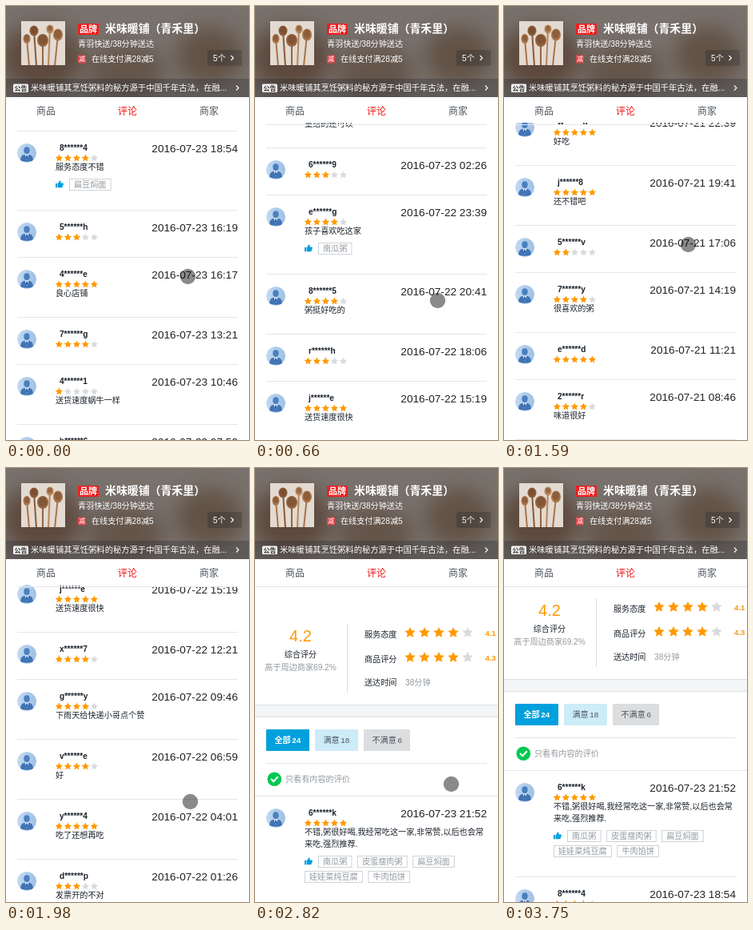
These frames come from a looping animation (304x543 px, 3.85 s). An HTML page:

```html
<!DOCTYPE html>
<html lang="zh-CN">
<head>
<meta charset="utf-8">
<title>商家评论</title>
<style>
html, body { margin: 0; width: 100%; height: 100%; overflow: hidden; background: #fff; }
svg { display: block; width: 100vw; height: 100vh; }
text { font-family: "Liberation Sans", "Noto Sans CJK SC", "Noto Sans CJK", sans-serif; white-space: pre; }
</style>
</head>
<body>
<svg viewBox="0 0 304 543">
  <defs>
    <clipPath id="listClip"><rect y="146" width="304" height="397"/></clipPath>
    <clipPath id="headClip"><rect width="304" height="114"/></clipPath>
    <clipPath id="photoClip"><rect width="55" height="55"/></clipPath>
    <clipPath id="faceClip"><circle r="12"/></clipPath>
    <filter id="blur" x="-30%" y="-30%" width="160%" height="160%"><feGaussianBlur stdDeviation="12"/></filter>
    <linearGradient id="sky" x1="0" x2="1"><stop offset="0" stop-color="#c3daf1"/><stop offset="1" stop-color="#9fc0e4"/></linearGradient>
    <g id="face" clip-path="url(#faceClip)">
      <circle r="12" fill="url(#sky)"/>
      <ellipse cy="-3.4" rx="3.7" ry="4.4" fill="#4a7fc0"/>
      <path d="M-8 9.5Q-8 2.6-2.6 1.8H2.6Q8 2.6 8 9.5Q0 12 -8 9.5Z" fill="#3f74b6"/>
      <path d="M-2.4 1.6L0 8.5L2.4 1.6Z" fill="#fff"/>
      <path d="M-.8 2.4H.8L1 6L0 8.2L-1 6Z" fill="#2c5c9c"/>
    </g>
    <path id="thumb" fill="#00a0dc" d="M-5-1H-2.6V4.2H-5ZM-2-1L.2-4.4Q1.9-4.6 1.5-1.4H4.2Q5.2-1 4.8.2L3.6 3.6Q3.3 4.2 2.6 4.2H-2Z"/>
  </defs>

  <rect width="304" height="543" fill="#fff"/>
  <g clip-path="url(#listClip)"><g id="list"></g></g>
  <rect id="edge" y="148" height="1" fill="#e6e7e9"/>
  <g id="head" clip-path="url(#headClip)">
    <rect width="304" height="114" fill="#78716c"/>
    <g fill="#5d4a3c" filter="url(#blur)">
      <ellipse cx="45" cy="65" rx="50" ry="42"/>
      <ellipse cx="150" cy="82" rx="48" ry="34" opacity=".7"/>
      <ellipse cx="255" cy="62" rx="42" ry="36" opacity=".8"/>
    </g>
    <rect y="91" width="304" height="23" fill="#07111b" opacity=".22"/>
    <g transform="translate(19 19)" clip-path="url(#photoClip)">
      <rect width="55" height="55" fill="#e3dad1"/>
      <g id="spoons"></g>
    </g>
  </g>
  <g id="tabs"></g>
  <circle id="dot" cx=".5" cy=".5" r="9.7" fill="#000" fill-opacity=".46"/>
</svg>
<script>
const $ = id => document.getElementById(id);
const DARK = '#1b232c', GRAY = '#93999f', MID = '#4d555d', GOLD = '#ff9900', LINE = '#e4e6e8';
const SIZE = 10.15;

// Text placed by its vertical middle
function text(s, x, mid, { size = SIZE, fill = DARK, weight = 400, anchor = 'start' } = {}) {
  return `<text x="${x}" y="${mid + size * 0.37}" font-size="${size}" fill="${fill}" ` +
    `text-anchor="${anchor}" font-weight="${weight}">${s}</text>`;
}
const rect = (x, y, w, h, fill, extra = '') =>
  `<rect x="${x}" y="${y}" width="${w}" height="${h}" fill="${fill}" ${extra}/>`;

function star(x, y, r, fill) {
  const pts = Array.from({ length: 10 }, (_, i) => {
    const a = (i / 5 - 0.5) * Math.PI, k = i % 2 ? r * 0.48 : r;
    return (x + k * Math.cos(a)).toFixed(2) + ',' + (y + k * Math.sin(a)).toFixed(2);
  });
  return `<polygon points="${pts.join(' ')}" fill="${fill}"/>`;
}
const stars = (n, x, y, r, gap) =>
  [0, 1, 2, 3, 4].map(i => star(x + i * gap, y, r, i < n ? GOLD : '#d8dade')).join('');

const chevron = (x, y) =>
  `<path d="M${x - 1.5} ${y - 3}l3 3l-3 3" fill="none" stroke="#fff" stroke-width="1.1"/>`;

// Wooden spoons: bowl x, y, radii, handle end x, colour
$('spoons').innerHTML = [
  [7, 22, 4.5, 6, 10, '#a9744a'], [16, 12, 5.5, 6.5, 19, '#8a5a37'], [36, 10, 4.5, 5.5, 34, '#b98659'],
  [27, 24, 7, 8, 27, '#946440'], [46, 17, 6, 7.5, 42, '#a87549']
].map(([x, y, rx, ry, end, c]) =>
  `<path d="M${x} ${y}L${end} 56" stroke="${c}" stroke-width="2"/>` +
  `<ellipse cx="${x}" cy="${y}" rx="${rx}" ry="${ry}" fill="${c}"/>` +
  `<ellipse cx="${x}" cy="${y - 1}" rx="${rx - 1.6}" ry="${ry - 2}" fill="#6b432a" opacity=".45"/>`
).join('');

const white = { fill: '#fff', weight: 500 };
$('head').insertAdjacentHTML('beforeend',
  rect(90, 22, 26, 14, '#f01e1e', 'rx="1"') +
  text('品牌', 103, 28.7, { size: 11, fill: '#fff', weight: 700, anchor: 'middle' }) +
  text('米味暖铺（青禾里）', 124, 28, { size: 13.9, fill: '#fff', weight: 700 }) +
  text('青羽快送/38分钟送达', 90, 47.7, white) +
  rect(90, 61.5, 10, 10, '#e0454a', 'rx="1"') +
  text('减', 95, 66.3, { size: 8, fill: '#fff', anchor: 'middle' }) +
  text('在线支付满28减5', 107, 66.2, white) +
  rect(252, 55, 43, 20, '#07111b', 'rx="2" opacity=".2"') +
  text('5个', 259, 65.2, white) + chevron(283, 65) +
  rect(9, 97.5, 19, 10.5, '#f4f4f4', 'rx="1.5"') +
  text('公告', 18.5, 102.8, { size: 8, fill: '#333', weight: 700, anchor: 'middle' }) +
  text('米味暖铺其烹饪粥料的秘方源于中国千年古法，在融...', 31, 102.5, { ...white, size: 10.3 }) +
  chevron(289.5, 102.5));

$('tabs').innerHTML = [['商品', 50, MID], ['评论', 152, '#f01414'], ['商家', 254, MID]]
  .map(([s, x, fill]) => text(s, x, 131.3, { size: 12, fill, anchor: 'middle' })).join('');

function summary() {
  const row = (label, y, n) => text(label, 137, y) +
    (n ? stars(4, 194, y - 2, 7.1, 18) + text(n, 288, y - 1.7, { size: 9.7, fill: GOLD, weight: 700 }) : '');
  const pill = (label, n, x, w, bg, fill, weight) => rect(x, 295, w, 27, bg, 'rx="1"') +
    text(label, x + 10.5, 308.5, { fill, weight }) +
    text(n, x + 12 + label.length * SIZE, 308.5, { fill, weight, size: 9.9 });
  const mid = { anchor: 'middle' };
  return text('4.2', 57, 178, { size: 20, fill: GOLD, ...mid }) +
    text('综合评分', 57, 201, mid) +
    text('高于周边商家69.2%', 57, 217, { fill: GRAY, ...mid }) +
    rect(115, 163, 1, 86, '#d9dbdd') +
    row('服务态度', 176, '4.1') + row('商品评分', 207, '4.3') + row('送达时间', 236) +
    text('38分钟', 188, 236, { fill: GRAY }) +
    rect(0, 264, 304, 16, '#dfe1e3') + rect(0, 265, 304, 14, '#f3f5f7') +
    pill('全部', '24', 14, 54, '#00a0dc', '#fff', 700) +
    pill('满意', '18', 75, 54, '#ccecf8', MID) +
    pill('不满意', '6', 136, 58, '#dbdddf', MID) +
    rect(14, 337, 276, 1, LINE) +
    '<circle cx="24.3" cy="357.2" r="8.8" fill="#00c850"/>' +
    '<path d="M20 357l3.2 3.2l5.6-6" fill="none" stroke="#fff" stroke-width="2"/>' +
    text('只看有内容的评价', 38, 357, { fill: GRAY }) +
    rect(0, 378, 304, 1, LINE);
}

// Name ends, date, stars, text lines, tag rows
const reviews = [
  ['6k', '07-23 21:52', 5, ['不错,粥很好喝,我经常吃这一家,非常赞,以后也会常', '来吃,强烈推荐.'],
    [['南瓜粥', '皮蛋瘦肉粥', '扁豆焖面'], ['娃娃菜炖豆腐', '牛肉馅饼']]],
  ['84', '07-23 18:54', 4, ['服务态度不错'], [['扁豆焖面']]],
  ['5h', '07-23 16:19', 3],
  ['4e', '07-23 16:17', 5, ['良心店铺']],
  ['7g', '07-23 13:21', 4],
  ['41', '07-23 10:46', 1, ['送货速度蜗牛一样']],
  ['h6', '07-23 07:59', 4, ['味道还不错']],
  ['5w', '07-23 05:12', 4, ['量给的还可以']],
  ['69', '07-23 02:26', 3],
  ['eg', '07-22 23:39', 4, ['孩子喜欢吃这家'], [['南瓜粥']]],
  ['85', '07-22 20:41', 4, ['粥挺好吃的']],
  ['rh', '07-22 18:06', 3],
  ['je', '07-22 15:19', 5, ['送货速度很快']],
  ['x7', '07-22 12:21', 4],
  ['gy', '07-22 09:46', 4, ['下雨天给快递小哥点个赞']],
  ['ve', '07-22 06:59', 4, ['好']],
  ['y4', '07-22 04:01', 5, ['吃了还想再吃']],
  ['dp', '07-22 01:26', 3, ['发票开的不对']],
  ['wu', '07-21 22:39', 5, ['好吃']],
  ['j8', '07-21 19:41', 5, ['还不错吧']],
  ['5v', '07-21 17:06', 2],
  ['7y', '07-21 14:19', 4, ['很喜欢的粥']],
  ['ed', '07-21 11:21', 5],
  ['2r', '07-21 08:46', 4, ['味道很好']]
];

function tagRow(tags, x, y) {
  return tags.map(tag => {
    const w = tag.length * SIZE + 12;
    const out = rect(x + 0.5, y - 7.5, w - 1, 14, 'none', 'stroke="#cfd3d6"') +
      text(tag, x + 6, y - 0.3, { fill: GRAY });
    x += w + 6.5;
    return out;
  }).join('');
}

function review([ends, date, n, lines = [], tags = []], y) {
  const tagTop = y + 31 + lines.length * 15;
  return `<use href="#face" x="26" y="${y + 6}"/>` +
    text(ends[0] + '******' + ends[1], 67, y - 0.5, { size: 10.1, weight: 700 }) +
    text('2016-' + date, 290, y, { size: 13.65, fill: '#222', anchor: 'end' }) +
    stars(n, 66.4, y + 12.4, 4.9, 11) +
    lines.map((s, i) => text(s, 62, y + 23.7 + i * 15)).join('') +
    tags.map((row, i) => (i ? '' : `<use href="#thumb" x="67" y="${tagTop - 1}"/>`) +
      tagRow(row, i ? 62 : 79, tagTop + i * 19)).join('');
}

let y = 400, html = summary();
for (const r of reviews) {
  const [, , , lines = [], tags = []] = r;
  html += review(r, y);
  y += 59 + (lines.length ? 1 + lines.length * 15 : 0) + (tags.length ? 5 + tags.length * 19 : 0);
  html += rect(14, y - 22, 276, 1, LINE);
}
$('list').innerHTML = html;

// time, scroll, pointer x, pointer y
const steps = [
  [0, 355, 227, 338], [130, 367, 227, 326], [270, 448, 227, 262], [390, 620, 228, 285],
  [510, 768, 228, 338], [660, 851, 228, 368], [810, 890, 228, 352], [930, 985, 229, 296],
  [1050, 1270, 230, 264], [1170, 1568, 230, 277], [1320, 1648, 230, 290], [1440, 1634, 230, 296],
  [1590, 1630, 230, 298], [1710, 1629, 230, 304], [1860, 1530, 230, 385], [1980, 1190, 230, 417],
  [2130, 780, 230, 404], [2250, 470, 228, 376], [2400, 170, 226, 352], [2550, 4, 225, 343],
  [2670, -30, 228, 350], [2820, -32, 245, 395], [2940, -14, 264, 465], [3090, -7, 278, 518],
  [3210, -3, 280, 527], [3330, -1, 280, 527], [3450, 0, 280, 527], [3600, 0, -40, 527]
];
const LOOP = 3850, start = performance.now();

function draw(now) {
  const t = Math.max(0, now - start) % LOOP;
  const [, scroll, x, py] = steps.findLast(s => s[0] <= t);
  $('list').setAttribute('transform', `translate(0 ${-scroll})`);
  $('dot').setAttribute('transform', `translate(${x} ${py})`);
  // The line under the tabs spans the stage only above the reviews
  const inset = scroll < 230 ? 0 : 14;
  $('edge').setAttribute('x', inset);
  $('edge').setAttribute('width', 304 - inset * 2);
  $('edge').setAttribute('opacity', t < 270 ? 0 : 1);
  requestAnimationFrame(draw);
}
draw(start);
</script>
</body>
</html>
```
